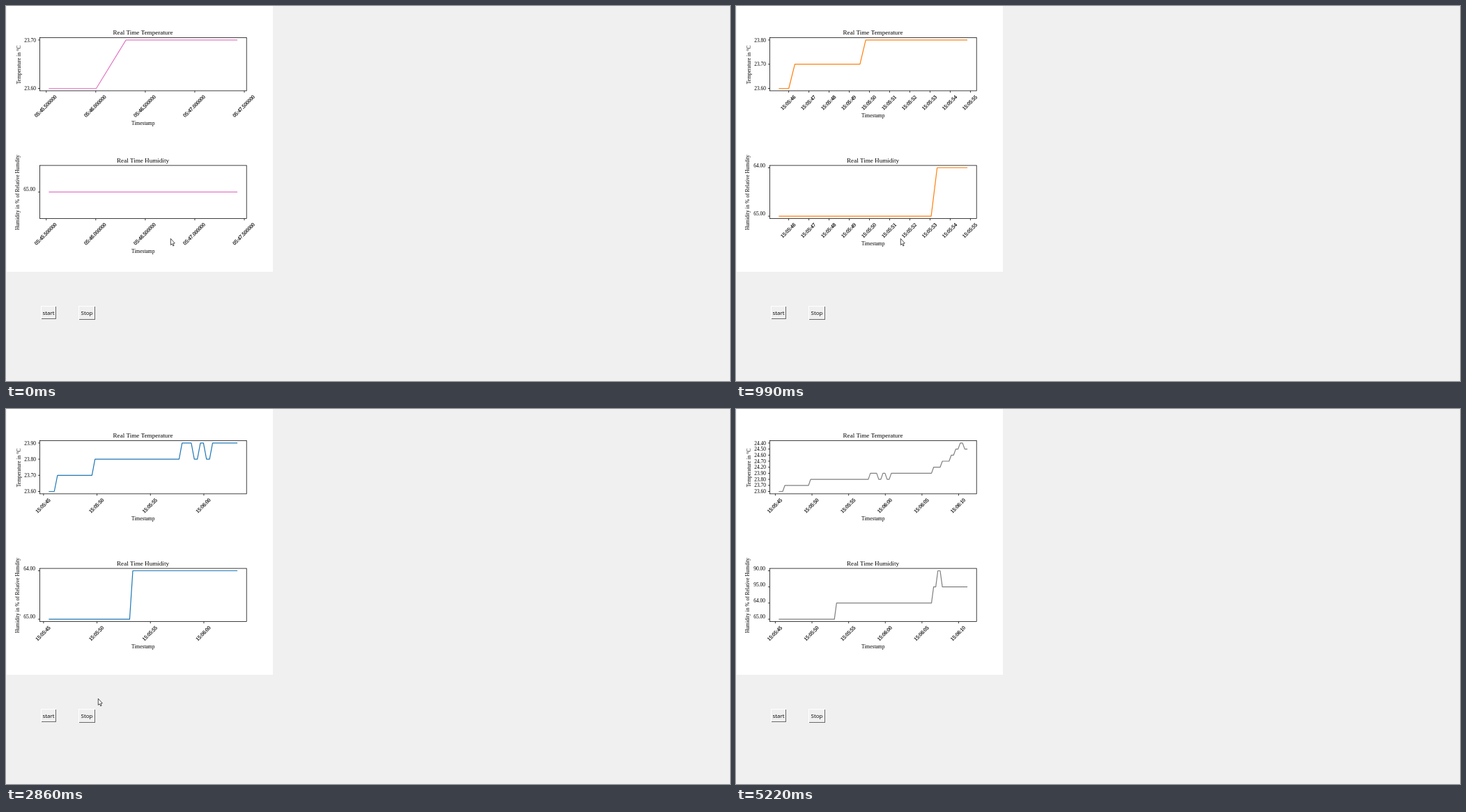
Recreate the animation shown at these times as an HTML page with a canvas. Size 1039 px wide and 539 px high, loop 5.32 s.

```html
<!DOCTYPE html>
<html lang="en">
<head>
<meta charset="utf-8">
<title>Real time sensor plots</title>
<style>
  html, body { margin: 0; width: 100%; height: 100%; overflow: hidden; background: #f0f0f0; }
  canvas { display: block; }
</style>
</head>
<body>
<canvas id="stage" width="1039" height="539"></canvas>
<script>
const ctx = document.getElementById('stage').getContext('2d');
const LOOP = 5320;
const SERIF = '"Liberation Serif", serif';
const SANS = '"Open Sans", sans-serif';
const COLORS = ['#1f77b4', '#ff7f0e', '#2ca02c', '#d62728', '#9467bd',
                '#8c564b', '#e377c2', '#7f7f7f', '#bcbd22', '#17becf'];

// Bursts of new samples: [start ms, end ms, count]
const BURSTS = [[100, 620, 15], [650, 1180, 15], [1220, 1750, 16], [1780, 2860, 8],
                [2960, 4540, 14], [4670, 4670, 1], [4800, 5220, 12]];
// Clock reading in seconds after 15:05 at certain samples
const CLOCK = [[0, 45.53], [1, 46.005], [2, 46.305], [6, 47.426], [13, 49.53], [15, 50.1],
               [31, 54.83], [45, 58.82], [60, 63.1], [74, 67.17], [87, 71.14]];
// Value changes: [first sample, label]
const TEMPERATURE = [[0, '23.60'], [2, '23.70'], [14, '23.80'], [42, '23.90'], [46, '23.80'],
  [48, '23.90'], [50, '23.80'], [52, '23.90'], [72, '24.20'], [76, '24.70'], [80, '24.60'],
  [82, '24.50'], [84, '24.40'], [86, '24.50']];
const HUMIDITY = [[0, '65.00'], [26, '64.00'], [72, '95.00'], [74, '90.00'], [76, '95.00']];
const POINTER = [[1780, 236, 334], [2040, 110, 358], [2290, 0, 386], [2400, 12, 396],
                 [2860, 132, 416], [2960, 132, 416], [3220, 430, 490], [3480, 786, 528],
                 [3580, 800, 530], [4070, 1011, 534]];

const AXES = { left: 48.6, right: 345.2, height: 76.4, stroke: 0.75 };
const DATA = { left: 62, right: 331.5, top: 3.4, bottom: 73 };

function interpolate(keys, at, column = 1) {
  if (at <= keys[0][0]) return keys[0][column];
  for (let i = 1; i < keys.length; i++) {
    const a = keys[i - 1], b = keys[i];
    if (at <= b[0]) return a[column] + (b[column] - a[column]) * (at - a[0]) / (b[0] - a[0]);
  }
  return keys[keys.length - 1][column];
}

function lastSample(ms) {
  let index = 6;
  for (const [start, end, count] of BURSTS) {
    if (ms < start) break;
    const step = (end - start) / (count - 1) || 1;
    index += Math.min(count, Math.floor((ms - start) / step + 0.12) + 1);
  }
  return index;
}

function text(str, x, y, size, { align = 'center', angle = 0, font = SERIF, color = '#000',
                                 baseline = 'alphabetic', weight = 0 } = {}) {
  ctx.save();
  ctx.translate(x, y);
  ctx.rotate(angle);
  ctx.font = `${size}px ${font}`;
  ctx.textAlign = align;
  ctx.textBaseline = baseline;
  ctx.fillStyle = ctx.strokeStyle = color;
  ctx.fillText(str, 0, 0);
  if (weight) {
    ctx.lineWidth = weight;
    ctx.strokeText(str, 0, 0);
  }
  ctx.restore();
}

function line(points, color, width, cap = 'butt') {
  ctx.beginPath();
  points.forEach(([x, y]) => ctx.lineTo(x, y));
  ctx.strokeStyle = color;
  ctx.lineWidth = width;
  ctx.lineCap = cap;
  ctx.lineJoin = 'round';
  ctx.stroke();
}

function rect(color, x, y, w, h) {
  ctx.fillStyle = color;
  ctx.fillRect(x, y, w, h);
}

const pad = n => String(n).padStart(2, '0');

function clockLabel(t, fine) {
  const min = pad(5 + Math.floor(t / 60)), sec = pad(Math.floor(t % 60));
  return fine ? `${min}:${sec}.${t % 1 ? '500000' : '000000'}` : `15:${min}:${sec}`;
}

function timeTicks(first, last) {
  const margin = (last - first) * 0.05;
  const span = (last - first) * 1.1;
  const fine = span < 5;
  const step = span < 3.5 ? 0.5 : span < 11 ? 1 : 5;
  const ticks = [];
  for (let t = Math.ceil((first - margin) / step) * step; t <= last + margin; t += step) ticks.push(t);
  return { ticks, fine };
}

function plot(top, title, changes, last, label) {
  const { left, right, height, stroke } = AXES;
  const begin = CLOCK[0][1], end = interpolate(CLOCK, last);
  const toX = t => DATA.left + (t - begin) / (end - begin) * (DATA.right - DATA.left);
  const seen = changes.filter(c => c[0] <= last);
  const levels = [...new Set(seen.map(c => c[1]))];
  const toY = value => {
    const k = levels.length > 1 ? levels.indexOf(value) / (levels.length - 1) : 0.5;
    return top + DATA.bottom + (DATA.top - DATA.bottom) * k;
  };

  const points = [];
  seen.forEach(([index, value], i) => {
    const stop = i + 1 < seen.length ? seen[i + 1][0] - 1 : last;
    for (const s of [index, stop]) points.push([toX(interpolate(CLOCK, s)), toY(value)]);
  });
  line(points, COLORS[last % 10], 1.2, 'square');

  ctx.strokeStyle = '#000';
  ctx.lineWidth = stroke;
  ctx.lineJoin = 'miter';
  ctx.strokeRect(left, top, right - left, height);

  for (const value of levels) {
    const y = toY(value);
    line([[left - 2.7, y], [left, y]], '#000', stroke);
    text(value, label.right, y + label.shift + 2.6, 7.5, { align: 'right' });
  }

  const { ticks, fine } = timeTicks(begin, end);
  const bottom = top + height;
  for (const t of ticks) {
    const x = toX(t);
    line([[x, bottom], [x, bottom + 2.7]], '#000', stroke);
    text(clockLabel(t, fine), x - 0.6, top + (fine ? 98.8 : 93.8), 7.5,
         { angle: -Math.PI / 4, baseline: 'middle', weight: 0.2 });
  }
  text('Timestamp', 196.7, top + (fine ? 125.9 : 114.8), 7.5);
  text(title, 196.5, top - 4.6, 9.1);
  text(label.name, label.x, top + label.y, 7.5, { angle: -Math.PI / 2 });
}

function button(label, x, width, height) {
  const y = 431;
  rect('#ffffff', x, y, width, height);
  rect('#696969', x + 1, y + 1, width - 1, height - 1);
  rect('#f0f0f0', x + 1, y + 1, width - 2, height - 2);
  text(label, x + width / 2, y + 13, 8, { font: SANS });
}

function pointer(x, y) {
  const shape = [[0, 0], [0, 9.2], [2, 7.5], [3.4, 10.6], [4.8, 10], [3.5, 7], [6, 6.7]];
  ctx.beginPath();
  shape.forEach(([dx, dy]) => ctx.lineTo(x + 0.3 + dx, y + 0.3 + dy));
  ctx.closePath();
  ctx.fillStyle = '#fff';
  ctx.fill();
  ctx.strokeStyle = '#222';
  ctx.lineWidth = 0.8;
  ctx.lineJoin = 'miter';
  ctx.stroke();
}

function tooltip() {
  rect('#a0a0a0', 1017, 524, 22, 15);
  rect('#ffffff', 1018, 525, 21, 14);
  text('Stop', 1022, 537, 8, { align: 'left', font: SANS, color: '#575757' });
}

function draw(ms) {
  rect('#f0f0f0', 0, 0, 1039, 539);
  rect('#ffffff', 1, 0, 382, 382);
  const last = lastSample(ms);
  plot(45.5, 'Real Time Temperature', TEMPERATURE, last,
       { name: 'Temperature in °C', x: 20.5, y: 39, right: 43, shift: 0 });
  plot(229.1, 'Real Time Humidity', HUMIDITY, last,
       { name: 'Humidity in % of Relative Humdity', x: 18.7, y: 38.9, right: 42, shift: -3.5 });
  button('start', 50, 22, 19);
  button('Stop', 104, 24, 20);
  if (ms >= 4320 && ms < 4800) tooltip();
  if (ms < 4170) pointer(Math.round(interpolate(POINTER, ms)), Math.round(interpolate(POINTER, ms, 2)));
}

const started = performance.now();
function tick() {
  draw((performance.now() - started) % LOOP);
  requestAnimationFrame(tick);
}
tick();
</script>
</body>
</html>
```
